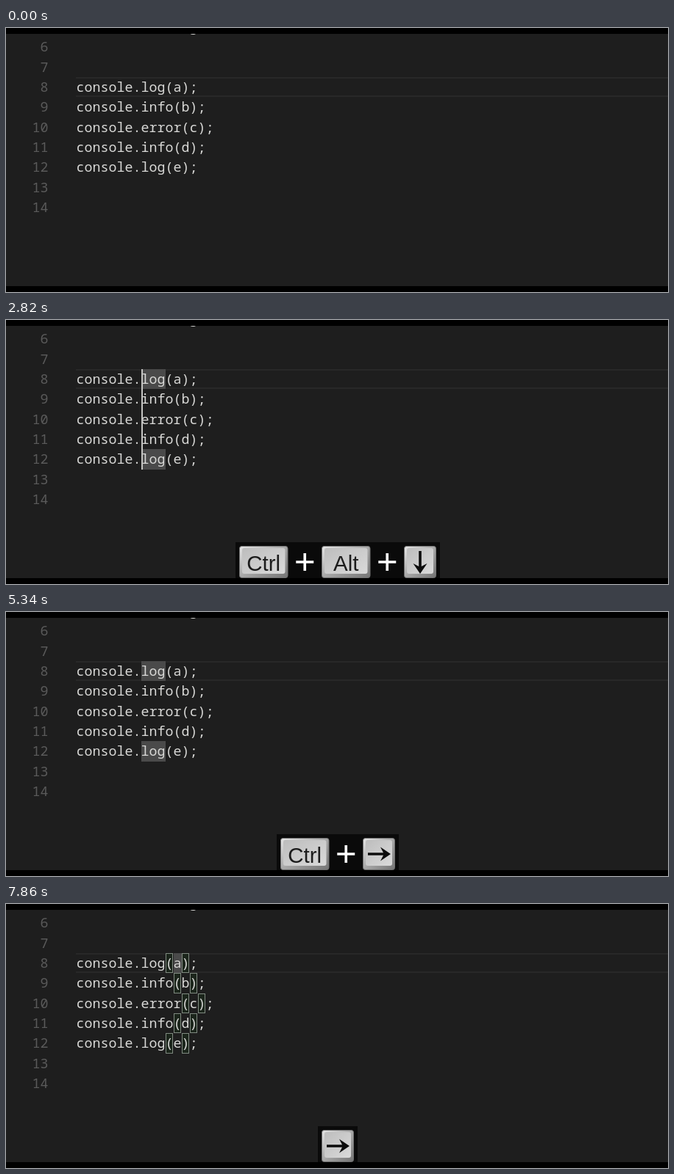
An HTML page that plays this animation: 900 px wide and 360 px high, repeating every 8 s.

```html
<!DOCTYPE html>
<html lang="en">
<head>
<meta charset="utf-8">
<title>Multi-cursor editing</title>
<style>
  html, body { margin: 0; width: 100%; height: 100%; overflow: hidden; background: #000; }
  svg { display: block; width: 900px; height: 360px; }
  .code { font: 18.33px "Noto Sans Mono", monospace; fill: #d8d8d6; white-space: pre; }
  .number { fill: #5a5a5a; text-anchor: end; }
  .label { font: 29.5px "Liberation Sans", Arial, sans-serif; fill: #1c1c1c; text-anchor: middle; }
</style>
</head>
<body>
<svg id="stage" viewBox="0 0 900 360">
  <defs>
    <linearGradient id="rim" x1="0" y1="0" x2="1" y2="1">
      <stop offset="0" stop-color="#e6e6e6"/>
      <stop offset=".5" stop-color="#a8a8a8"/>
      <stop offset="1" stop-color="#747474"/>
    </linearGradient>
    <linearGradient id="face" x1="0" y1="0" x2="1" y2="1">
      <stop offset="0" stop-color="#bdbdbd"/>
      <stop offset="1" stop-color="#dadada"/>
    </linearGradient>
    <clipPath id="editor"><rect y="8" width="900" height="344"/></clipPath>
  </defs>
</svg>
<script>
const LOOP = 8000;
const CHAR = 11, LEFT = 95.5, FIRST_ROW = 8;
const lines = ["console.log(a);", "console.info(b);", "console.error(c);", "console.info(d);", "console.log(e);"];

const stage = document.getElementById("stage");

function add(parent, tag, attrs = {}, text = "") {
  const node = document.createElementNS("http://www.w3.org/2000/svg", tag);
  for (const name in attrs) node.setAttribute(name, attrs[name]);
  node.textContent = text;
  parent.append(node);
  return node;
}

const rect = (parent, x, y, width, height, fill, more = {}) =>
  add(parent, "rect", { x, y, width, height, fill, ...more });
const rowTop = row => Math.round(67 + 27.3 * (row - FIRST_ROW));
const rowHeight = row => rowTop(row + 1) - rowTop(row);
const colX = col => Math.round(LEFT + CHAR * col);
const show = (node, on) => node.setAttribute("visibility", on ? "visible" : "hidden");

// Editor
rect(stage, 0, 0, 900, 360, "#000");
const editor = add(stage, "g", { "clip-path": "url(#editor)" });
rect(editor, 0, 8, 900, 344, "#1e1e1e");
rect(editor, 95, 67, 805, 2, "#282828");
rect(editor, 95, 92, 805, 2, "#282828");

function highlight(row, col, length) {
  return rect(editor, colX(col), rowTop(row), CHAR * length, rowHeight(row), "#4a4a4a");
}
const wordMarks = [highlight(8, 8, 3), highlight(12, 8, 3)];
const argMark = highlight(8, 12, 1);

const brackets = add(editor, "g", { stroke: "#7f8a80" });
lines.forEach((line, i) => {
  const row = FIRST_ROW + i;
  for (const mark of "()") {
    rect(brackets, colX(line.indexOf(mark)) + .5, rowTop(row) + .5, 9, rowHeight(row) - 1, "#1b251b");
  }
});

function codeText(row, x, text, kind = "") {
  add(editor, "text", { class: "code " + kind, x, y: rowTop(row) + 20 }, text);
}
codeText(5, LEFT + CHAR * 14, "g");
lines.forEach((line, i) => codeText(FIRST_ROW + i, LEFT, line));
for (let row = 6; row <= 14; row++) codeText(row, 57.5, row, "number");

const carets = lines.map((_, i) =>
  rect(editor, 0, rowTop(FIRST_ROW + i), 2, rowHeight(FIRST_ROW + i), "#c4c4c2"));

// Key caps
const KEY_TOP = 308, KEY_HEIGHT = 44, GAP = 45.5, PAD = 5;
const arrows = { right: 0, down: 90 };

function drawKey(parent, x, name) {
  const isArrow = name in arrows, width = isArrow ? 44 : 66.5;
  const cx = x + width / 2;
  rect(parent, x + .5, KEY_TOP + .5, width - 1, KEY_HEIGHT - 1, "url(#rim)", { rx: 3, stroke: "#707070" });
  rect(parent, x + 4, KEY_TOP + 3, width - 8, KEY_HEIGHT - 9, "url(#face)", { rx: 3 });
  if (isArrow) {
    add(parent, "path", {
      d: "M-15 -1.8H6L2 -9.5L16 0L2 9.5L6 1.8H-15Z", fill: "#0c0c0c",
      transform: `translate(${cx} 330) rotate(${arrows[name]})`
    });
  } else {
    add(parent, "text", { class: "label", x: cx, y: 342 }, name);
  }
  return width;
}

function drawShortcut(...names) {
  const group = add(stage, "g");
  const keysWidth = names.reduce((sum, name) => sum + (name in arrows ? 44 : 66.5), 0);
  const width = keysWidth + GAP * (names.length - 1) + 2 * PAD;
  let x = 451 - width / 2;
  rect(group, x, 303, width, 49, "#0a0a0a");
  x += PAD;
  names.forEach((name, i) => {
    if (i) {
      add(group, "path", {
        d: `M${x + GAP / 2 - 12} 330h24m-12 -12v24`, stroke: "#fff", "stroke-width": 3.6
      });
      x += GAP;
    }
    x += drawKey(group, x, name);
  });
  return group;
}

const shortcuts = [
  { node: drawShortcut("Ctrl", "Alt", "down"), from: 2000, to: 5340 },
  { node: drawShortcut("Ctrl", "right"), from: 5340, to: 7030 },
  { node: drawShortcut("right"), from: 7030, to: LOOP }
];

// Timing
const caretStart = [0, 2060, 2270, 2550, 2820];
const caretOn = [[310, 820], [1310, 1820], [2060, 3310], [3790, 4270], [4790, 5270],
                 [5410, 5890], [6370, 6930], [7100, 7860]];

function caretCol(line, t) {
  const open = line.indexOf("(");
  return t < 5410 ? 8 : t < 7100 ? open : t < 7340 ? open + 1 : open + 2;
}

function render(t) {
  const lit = caretOn.some(([from, to]) => t >= from && t < to);
  carets.forEach((caret, i) => {
    caret.setAttribute("x", colX(caretCol(lines[i], t)));
    show(caret, lit && t >= caretStart[i]);
  });
  wordMarks.forEach(mark => show(mark, t >= 2550 && t < 5410));
  show(argMark, t >= 7580);
  show(brackets, t >= 5440);
  shortcuts.forEach(({ node, from, to }) => show(node, t >= from && t < to));
}

const start = performance.now();
function tick() {
  render((performance.now() - start) % LOOP);
  requestAnimationFrame(tick);
}
tick();
</script>
</body>
</html>
```
